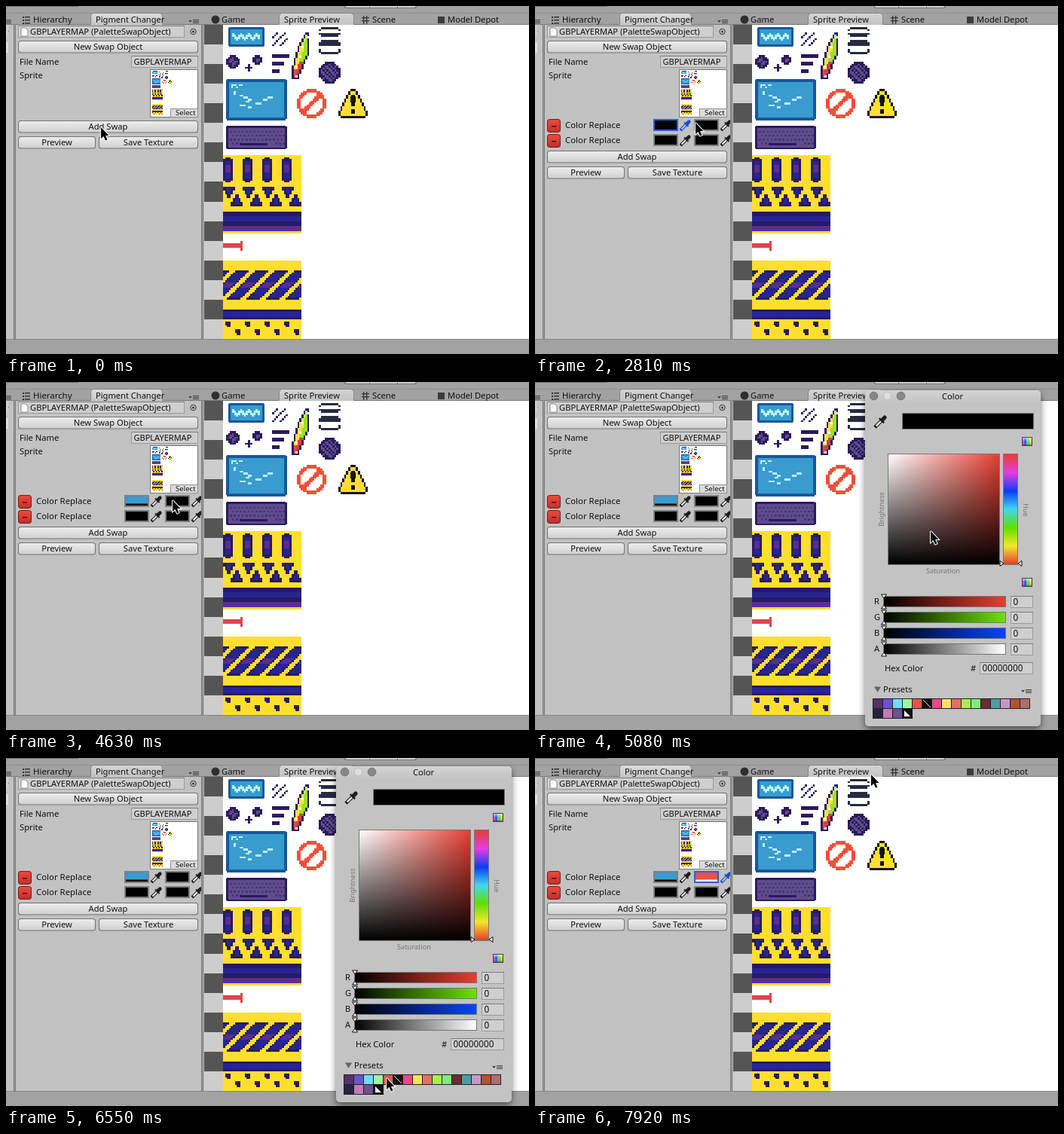
These frames come from a looping animation (694x462 px, 8000 ms). An HTML page with a canvas:

```html
<!DOCTYPE html>
<html>
<head>
<meta charset="utf-8">
<style>
html, body { margin: 0; width: 100%; height: 100%; overflow: hidden; background: #a2a2a2; }
canvas { display: block; }
</style>
</head>
<body>
<canvas id="stage" width="694" height="462"></canvas>
<script>
const stage = document.getElementById('stage').getContext('2d');
let g = stage;
const LOOP = 8000, U = 2.6;
const NAVY = '#2a1a5e', INDIGO = '#262591', VIOLET = '#5a2d91', MAUVE = '#5f4d8a', YELLOW = '#ffdf2d';
const DEEP = '#14599b', SKY = '#3a9bcf', ICE = '#b9f5f3', RED = '#ea5148', PANEL = '#c2c2c2';

// ---- drawing helpers ----
function fill(c, x, y, w, h) { g.fillStyle = c; g.fillRect(x, y, w, h); }
function edge(c, x, y, w, h) { g.strokeStyle = c; g.lineWidth = 1; g.strokeRect(x + .5, y + .5, w - 1, h - 1); }
function poly(c, ...p) {
  g.beginPath();
  for (let i = 0; i < p.length; i += 2) g.lineTo(p[i], p[i + 1]);
  g.closePath(); g.fillStyle = c; g.fill();
}
function line(c, width, ...p) {
  g.beginPath();
  for (let i = 0; i < p.length; i += 2) g.lineTo(p[i], p[i + 1]);
  g.strokeStyle = c; g.lineWidth = width; g.stroke();
}
function disc(c, x, y, r) { g.beginPath(); g.arc(x, y, r, 0, 7); g.fillStyle = c; g.fill(); }
function ring(c, x, y, r, width = 1) { g.beginPath(); g.arc(x, y, r, 0, 7); g.strokeStyle = c; g.lineWidth = width; g.stroke(); }
function round(c, x, y, w, h, r) { g.beginPath(); g.roundRect(x, y, w, h, r); g.fillStyle = c; g.fill(); }
function ramp(colors, x0, y0, x1, y1) {
  const r = g.createLinearGradient(x0, y0, x1, y1);
  colors.forEach((c, i) => r.addColorStop(i / (colors.length - 1), c));
  return r;
}
function text(s, x, y, align = 'left', size = 11.2, color = '#111') {
  g.font = size + 'px "Noto Sans", "Open Sans", sans-serif';
  g.textAlign = align; g.fillStyle = color; g.fillText(s, x, y);
}
function turned(s, x, y, angle) {
  g.save(); g.translate(x, y); g.rotate(angle);
  text(s, 0, 3, 'center', 9, '#747474');
  g.restore();
}

// ---- sprite sheet ----
let ox = 0, oy = 0;
function at(x, y) { ox = x; oy = y; }
function px(c, x, y, w = 1, h = 1) {
  const l = Math.round(ox + x * U), t = Math.round(oy + y * U);
  fill(c, l, t, Math.round(ox + (x + w) * U) - l, Math.round(oy + (y + h) * U) - t);
}
function slab(rim, inner, w, h, b = 1) {
  px(rim, .5, 0, w - 1, h); px(rim, 0, .5, w, h - 1);
  px(inner, b, b, w - 2 * b, h - 2 * b);
}
function grid(w, h, pick) {
  for (let y = 0; y < h; y++) for (let x = 0; x < w; x++) {
    const c = pick(x, y);
    if (c) px(c, x, y);
  }
}
function drawTiles() {
  at(288, 198);
  px(YELLOW, 0, 0, 40, 40);
  for (let x = 0; x < 40; x += 10) {
    px(NAVY, x + 1, 1, 3, 13); px(NAVY, x, 2, 5, 11);
    px(INDIGO, x + 1, 3, 3, 9); px(VIOLET, x + 1, 5, 3, 4);
    for (let r = 0; r < 6; r++) {
      const k = r >> 1;
      px(NAVY, x + k, 16 + r, 6 - 2 * k);
      px(NAVY, x + 4 + 2 - k, 20 + r, 2 + 2 * k);
    }
    px(INDIGO, x + 2, 17, 2, 3);
    px(INDIGO, x + 6, 22, 2, 3);
  }
  px(NAVY, 0, 29, 40, 7); px(INDIGO, 0, 31, 40, 3); px(VIOLET, 0, 36, 40, 3);

  at(288, 338);
  px(YELLOW, 0, 0, 40, 40);
  grid(40, 20, (x, y) => {
    const k = (x + y + 2) % 10;
    if (y < 5 || k < 3) return;
    if (k == 3 || k == 9 || y < 6 || y > 18) return NAVY;
    return y > 10 && y < 14 ? VIOLET : INDIGO;
  });
  px(NAVY, 0, 25, 40, 5); px(INDIGO, 0, 26, 40, 3);
  for (let x = 0; x < 40; x += 10) for (const [dx, dy] of [[0, 31], [5, 35]]) {
    px(NAVY, x + dx + 1, dy, 2, 2); px(NAVY, x + dx + 2, dy + 1, 2, 2);
    px(NAVY, x + dx + 3, dy, 1, 1);
  }
  fill('#e2434a', 288, 315, 24, 6); fill('#e2434a', 311, 312, 3, 13);
}
function drawIcons() {
  at(295, 28);
  slab(DEEP, SKY, 18.4, 10);
  for (let i = 0; i < 14; i++) px(ICE, 2 + i, 3 + [0, 1, 2, 1][i % 4], 1, 2);

  at(353, 35);
  for (const [x, y, n] of [[0, 2, 3], [0, 6, 7], [4, 6, 4]])
    for (let i = 0; i < n; i++) px(NAVY, x + i, y - i);

  at(379, 35);
  for (let r = 0; r < 24; r++) {
    const l = Math.round(7 * (1 - r / 23) ** 2), e = Math.round(r < 11 ? 9 : 9 - (r - 10) * .42);
    px(NAVY, l, r, e - l);
    if (r && r < 23) {
      px(r < 15 ? '#9be02c' : '#d8403c', l + 1, r, e - l - 2);
      px(r < 5 ? '#c9f77a' : r < 19 ? '#ffe04a' : '#ee5138', l + 1, r, Math.max(1, (e - l - 2) / 2 | 0));
      if (r % 5 == 2) px('#fff', l + 2, r);
    }
  }

  const ink = '#282a40';
  at(415, 28);
  px(ink, 1, 0, 9); px(ink, 0, 1); px(ink, 10, 1);
  px(ink, 0, 3, 11); px(ink, 1, 4, 9);
  px(ink, 1, 6.5, 9); px(ink, 0, 7.5, 11, 2); px(ink, 0, 11, 1, 2); px(ink, 10, 11, 1, 2); px(ink, 1, 12.8, 9);

  for (const [x, y, n] of [[292, 65, 7], [327, 65, 5]]) {
    at(x, y);
    const m = (n - 1) / 2;
    grid(n, n, (i, j) => {
      const d = Math.abs(i - m) + Math.abs(j - m);
      return d <= m + 1 && (d > m - 1 || (i + j) % 3 == 0 ? NAVY : MAUVE);
    });
  }
  at(317, 77);
  px(NAVY, 0, 1.4, 4); px(NAVY, 1.5, 0, 1, 4);
  at(353, 64);
  px(NAVY, 0, 0, 9, 2); px(NAVY, 0, 3.8, 6, 2); px(NAVY, 0, 7.6, 4, 2);

  at(415, 74);
  grid(11, 11, (x, y) => {
    const d = Math.hypot(x - 5, y - 5);
    return d < 5.6 && (d > 4.3 || (x * 2 + y * 3) % 5 < 2 ? NAVY : MAUVE);
  });

  at(292, 97);
  slab(DEEP, SKY, 31, 21, 1.5);
  px(ICE, 2.5, 2.5, 3); px(ICE, 2.5, 3.5); px(ICE, 6.5, 2.5, 2); px(ICE, 5, 3.8); px(ICE, 4, 6, 1, 2);
  for (const [x, y, w] of [[7, 8, 2], [9, 9, 2], [11, 10, 2], [10, 11, 2], [7, 13, 3], [11, 14, 2], [15, 12, 3], [19, 10, 2], [21, 9, 3]])
    px(ICE, x, y, w);

  at(386, 110);
  grid(15, 15, (x, y) => {
    const d = Math.hypot(x - 7, y - 7);
    return d < 7.6 && (d > 5.4 || Math.abs(x + y - 14) < 2) && '#ee5138';
  });

  at(441, 110);
  for (let r = 0; r < 15; r++) {
    const h = Math.min(7.5, Math.floor(1.5 + r / 2) + .5) - (r == 14 ? 1 : 0);
    px('#111', 7.5 - h, r, 2 * h);
    if (r && r < 14) px(YELLOW, 8.5 - h, r, 2 * h - 2);
  }
  px('#111', 6.5, 3, 2, 6); px('#111', 6, 4, 3, 3); px('#111', 6.5, 10.5, 2, 2);

  at(292, 159);
  slab(NAVY, MAUVE, 31, 12);
  for (let y = 0; y < 4; y++) for (let x = 0; x < 27; x += 2)
    if (y < 3 || x < 5 || x > 20) px('#43337a', 2 + x + y % 2, 2.5 + y * 2);
  px(NAVY, 7, 9, 14, 1);
}
const sheet = document.createElement('canvas');
sheet.width = 406; sheet.height = 417;
g = sheet.getContext('2d');
fill('#fff', 0, 0, 406, 417);
g.translate(-288, -25);
drawTiles(); drawIcons();
g = stage;

// ---- controls ----
function button(label, x, y, w, down) {
  round('#747474', x, y, w, 16.5, 3.5);
  round(down ? ramp(['#8c8c8c', '#a4a4a4'], 0, y, 0, y + 16) : ramp(['#eee', '#cfcfcf'], 0, y, 0, y + 16), x + 1, y + 1, w - 2, 14.5, 3);
  text(label, x + w / 2, y + 12, 'center');
}
function field(s, x, y, w, size) {
  fill('#cfcfcf', x, y, w, 16); edge('#9a9a9a', x, y, w, 16);
  fill('#7d7d7d', x, y, w, 1);
  text(s, x + 3.5, y + 12, 'left', size);
}
function dropper(x, y, s, lit) {
  const c = lit ? '#1d50c8' : '#1c1c1c';
  g.save(); g.translate(x, y); g.scale(s, s);
  line(c, 4, 0, 14, 1.5, 12.5, 8, 6);
  line(lit ? '#a9c6ff' : '#fff', 2, 1.5, 12.5, 8, 6);
  line(c, 2, 5, 3.5, 10.5, 9);
  g.lineCap = 'round';
  line(c, 4.6, 8.5, 5.5, 11.3, 2.7);
  g.restore();
}
function swatch(x, y, color, alpha, lit) {
  fill(lit ? '#2c5fd0' : '#7f7f7f', x - 1, y - 1, 33, 16);
  fill(color, x + 1, y + 1, 29, 12);
  if (alpha) fill(alpha, x + 1, y + 10.5, 29, 2.5);
  dropper(x + 35, y, 1, lit);
}
function menuIcon(x, y) {
  poly('#444', x, y, x + 5, y, x + 2.5, y + 3);
  for (let i = 0; i < 3; i++) fill('#444', x + 6, y - 1 + i * 2, 8, 1);
}
function swapRow(y, a, b, lit) {
  round('#7c1c18', 16, y - 8, 18, 18, 4);
  round(ramp(['#ea4a40', '#c22f2a'], 0, y - 7, 0, y + 9), 17, y - 7, 16, 16, 3);
  fill('#4a0806', 22, y + 1, 6, 1.5);
  text('Color Replace', 40, y + 4, 'left', 11.4);
  swatch(158, y - 7, a, a != '#000' && '#000', lit == 1);
  swatch(212, y - 7, b, b != '#000' && '#fff', lit == 2);
}
function tab(label, x, y, w, h, focused) {
  g.beginPath(); g.roundRect(x, y, w, h, [4, 4, 0, 0]);
  g.fillStyle = ramp([focused ? '#dedede' : '#d4d4d4', PANEL], 0, y, 0, y + h); g.fill();
  g.strokeStyle = '#858585'; g.lineWidth = 1; g.stroke();
  fill(PANEL, x, y + h - 1, w, 2);
  text(label, x + 6.5, 21.5, 'left', 11.1);
}

function drawEditor(t, tip) {
  const rows = (t >= 950) + (t >= 1680), open = t >= 4670 && t < 7890;
  const lit = t >= 7920 ? 2 : t < 4630 ? 1 : 0;
  fill('#a2a2a2', 0, 0, 694, 462);
  fill('#6b6b6b', 0, 0, 96, 1);
  round('#707070', 449, -6, 96, 9, 3); round('#cfcfcf', 450, -6, 94, 8, 3);
  fill('#777', 482, 0, 1, 2); fill('#777', 519, 0, 1, 2);
  fill('#8f8f8f', 0, 9, 694, 1);
  for (const [x, w] of [[0, 10], [13, 246], [262, 432]]) {
    fill('#777', x - 1, 24, w + 2, 419);
    fill(PANEL, x, 25, w, 417);
  }
  fill('#858585', 0, 442, 694, 1);
  fill('#777', 0, 33, 4, 1); fill('#cfcfcf', 0, 26, 3, 15); fill('#e0e0e0', 0, 48, 3, 14);
  menuIcon(-7, 19);

  for (const y of [14, 18, 22]) { fill('#333', 22, y, 2, 2); fill('#333', 25, y, 7, 1.5); }
  text('Hierarchy', 36, 21.5, 'left', 11.4);
  tab('Pigment Changer', 112.5, 9.5, 95, 16, !open);
  menuIcon(242, 19);
  disc('#2f2f2f', 278, 18, 5.5);
  text('Game', 286, 21.5);
  tab('Sprite Preview', 362.5, 9.5, 99, 16);
  for (const d of [0, 4]) { fill('#333', 474 + d, 13, 1.3, 11); fill('#333', 472, 15 + d, 10, 1.3); }
  text('Scene', 486, 21.5);
  fill('#3b3b3b', 573, 14, 9, 9);
  text('Model Depot', 586, 21.5);

  g.drawImage(sheet, 288, 25);
  for (let i = 0; i < 16; i++) fill(i % 2 ? '#cdcdcd' : '#555', 263, 25 + Math.round(i * 26.06), 25, 27);
  fill('#858585', 262, 442, 432, 1); fill('#a2a2a2', 262, 443, 432, 19);

  g.save(); g.beginPath(); g.rect(13, 25, 246, 417); g.clip();
  field('', 16, 26, 221);
  poly('#fff', 20, 29, 26, 29, 29, 32, 29, 40, 20, 40);
  line('#777', .8, 20, 29, 26, 29, 29, 32, 29, 40, 20, 40, 20, 29);
  text('GBPLAYERMAP (PaletteSwapObject)', 32, 38);
  ring('#333', 248.5, 34, 3.7); disc('#333', 248.5, 34, 1.5);
  button('New Swap Object', 16, 46, 239);
  text('File Name', 18, 78);
  field('GBPLAYERMAP', 166, 66, 89, 11);
  text('Sprite', 18, 96);
  fill('#777', 191, 84, 64, 64); fill('#fff', 192, 85, 62, 62);
  g.drawImage(sheet, 193.5, 86, 56.8, 58.4);
  fill('#909090', 218, 136, 37, 12); fill('#dcdcdc', 219, 137, 35, 10);
  text('Select', 225, 145, 'left', 9.6);

  const picked = t >= 3340 || (t > 2760 && tip[0] > 291);
  if (rows > 0) swapRow(158, picked ? SKY : '#000', t >= 6760 ? RED : '#000', lit);
  if (rows > 1) swapRow(178, '#000', '#000', 0);
  const y = 152 + 20 * rows;
  button('Add Swap', 16, y, 239, (t >= 870 && t < 950) || (t >= 1590 && t < 1680));
  button('Preview', 16, y + 21, 103);
  button('Save Texture', 123, y + 21, 132);
  g.restore();
}

// ---- colour window ----
const HUES = ['#e63e32', '#e83ce0', '#0a3cf5', '#40d8ee', '#5fe000', '#f5e62a', '#e63e32'];
const PRESETS = ['#55306b', '#6a53ce', '#6fdcfb', '#a0f5a0', '#e9514a', '#111', '#ea4785', '#f8e25e',
  '#e07068', '#a8ef52', '#7fec7c', '#6a2b35', '#4c9da3', '#c399cb', '#b5502f', '#b06c6e', '#272340', '#c27cb5', '#6f4f8e'];

function slider(name, y, colors, v) {
  text(name, 450, y + 10);
  fill('#777', 462, y - 1, 163, 15);
  fill(ramp(colors, 463, 0, 624, 0), 463, y, 161, 13);
  const x = 463 + v / 255 * 161;
  for (const [tipY, d] of [[y + 2, -5], [y + 11, 5]]) {
    poly('#eee', x, tipY, x - 3.5, tipY + d, x + 3.5, tipY + d);
    line('#111', 1, x, tipY, x - 3.5, tipY + d, x + 3.5, tipY + d, x, tipY);
  }
  field(String(v), 631, y - 1, 30, 11.8);
}
function modeIcon(x, y) {
  fill('#444', x, y, 14, 12);
  fill(ramp(HUES, x, 0, x + 14, 0), x + 1, y + 1, 12, 10);
  fill(ramp(['#fffc', '#fff0', '#000a'], 0, y, 0, y + 12), x + 1, y + 1, 12, 10);
}
function drawPicker(t) {
  const set = t >= 6760, hover = t >= 7400;
  g.save();
  g.shadowColor = '#0008'; g.shadowBlur = 10; g.shadowOffsetY = 4;
  round('#c3c3c3', 438, 11, 233, 446, 5);
  g.restore();
  round(ramp(['#d3d3d3', '#c3c3c3'], 0, 11, 0, 28), 438, 11, 233, 17, [5, 5, 0, 0]);
  [449.5, 467.5, 485.5].forEach((x, i) => {
    disc(i == 1 ? '#dedede' : '#888', x, 18.5, 5.3);
    ring(i == 1 ? '#bbb' : '#6e6e6e', x, 18.5, 5.3);
  });
  if (hover) {
    line('#222', 1.4, 447, 16, 452, 21); line('#222', 1.4, 452, 16, 447, 21);
    line('#222', 1.4, 482.5, 18.5, 488.5, 18.5); line('#222', 1.4, 485.5, 15.5, 485.5, 21.5);
  }
  text('Color', 554, 23, 'center');
  dropper(451, 44, 1.15);
  fill('#777', 487, 41, 175, 22);
  fill(set ? RED : '#000', 488, 42, 173, 20);
  if (set) fill('#fff', 488, 58, 173, 4);
  modeIcon(646, 73); modeIcon(646, 260);

  fill('#777', 468, 95, 149, 148);
  fill(HUES[0], 469, 96, 147, 146);
  fill(ramp(['#fff', '#fff0'], 469, 0, 616, 0), 469, 96, 147, 146);
  fill(ramp(['#0000', '#000'], 0, 96, 0, 242), 469, 96, 147, 146);
  if (set) ring('#111', 581, 101, 3.7, 1.4);
  turned('Brightness', 460, 169, -Math.PI / 2);
  turned('Hue', 651, 170, Math.PI / 2);
  text('Saturation', 541.5, 254, 'center', 9.2, '#747474');
  fill('#777', 621, 95, 20, 148);
  fill(ramp(HUES, 0, 96, 0, 242), 622, 96, 18, 146);
  for (const [x, d] of [[622, -5], [641, 5]]) {
    poly('#eee', x, 241, x + d, 237.5, x + d, 244.5);
    line('#111', 1, x, 241, x + d, 237.5, x + d, 244.5, x, 241);
  }

  slider('R', 285, set ? ['#123a3c', RED] : ['#000', '#e63e32'], set ? 255 : 0);
  slider('G', 306, set ? ['#e8423c', '#fdf048'] : ['#000', '#6fe000'], set ? 54 : 0);
  slider('B', 327, set ? ['#e94a2c', '#e85af5'] : ['#000', '#0a44fa'], set ? 54 : 0);
  slider('A', 348, ['#000', '#fff'], set ? 255 : 0);
  text('Hex Color', 464, 384);
  text('#', 578, 384);
  field(set ? 'FF3636FF' : '00000000', 590, 372, 71, 11.8);

  poly('#666', 450, 404.5, 459, 404.5, 454.5, 412);
  g.save(); text('Presets', 462, 412); g.restore();
  menuIcon(645, 409);
  PRESETS.forEach((c, i) => {
    const x = 448 + i % 16 * 13, y = i < 16 ? 420 : 433;
    fill('#222', x, y, 14, 14); fill(c, x + 1, y + 1, 12, 12);
    if (i == 5) line('#ddd', 1, x + 2, y + 2, x + 12, y + 12);
  });
  fill('#111', 487, 433, 14, 14); fill('#fff', 489, 435, 10, 10);
  fill(set ? RED : '#111', 490, 436, 8, 8);
  edge('#111', 489, 435, 10, 10);
  if (!set) poly('#fff', 490, 436, 498, 444, 490, 444);
}

// ---- pointer: time, x, y ----
const PATH = [[0, 126, 161], [1235, 126, 161], [1410, 126, 179], [1815, 126, 179], [2180, 188, 154], [2310, 199, 158],
  [2745, 199, 158], [3100, 387, 114], [3340, 353, 121], [3770, 353, 121], [3790, 340, 118], [3980, 204, 156],
  [4145, 204, 156], [4300, 221, 157], [4935, 221, 157], [5080, 524, 198], [5330, 601, 313], [5730, 530, 190],
  [5750, 530, 190], [5900, 550, 278], [6100, 562, 330], [6550, 505, 425], [6895, 505, 425], [7010, 499, 76],
  [7290, 475, 28], [7450, 460, 15], [7620, 446, 22], [8000, 446, 22]];
function slope(i, k) {
  const a = PATH[i - 1], b = PATH[i], c = PATH[i + 1];
  if (!a || !c || a[k] == b[k] || b[k] == c[k]) return 0;
  return (c[k] - a[k]) / (c[0] - a[0]);
}
function pointerAt(t) {
  let i = 0;
  while (i < PATH.length - 2 && PATH[i + 1][0] <= t) i++;
  const a = PATH[i], b = PATH[i + 1], d = b[0] - a[0], u = (t - a[0]) / d, v = 1 - u;
  return [1, 2].map(k => v * v * (1 + 2 * u) * a[k] + u * u * (1 + 2 * v) * b[k]
    + d * u * v * (v * slope(i, k) - u * slope(i + 1, k)));
}
function drawPointer([x, y]) {
  g.save(); g.translate(Math.round(x), Math.round(y));
  const p = [0, 0, 0, 15, 3.5, 12, 6, 17.5, 8.5, 16.5, 6, 11, 10.5, 11];
  line('#fff', 2, ...p, 0, 0);
  poly('#000', ...p);
  g.restore();
}

function frame(now) {
  const t = now % LOOP, tip = pointerAt(t);
  drawEditor(t, tip);
  if (t >= 4670 && t < 7890) drawPicker(t);
  if (t < 7020 || t >= 7290) drawPointer(tip);
}
const start = performance.now();
function tick() {
  frame(performance.now() - start);
  requestAnimationFrame(tick);
}
tick();
</script>
</body>
</html>
```
